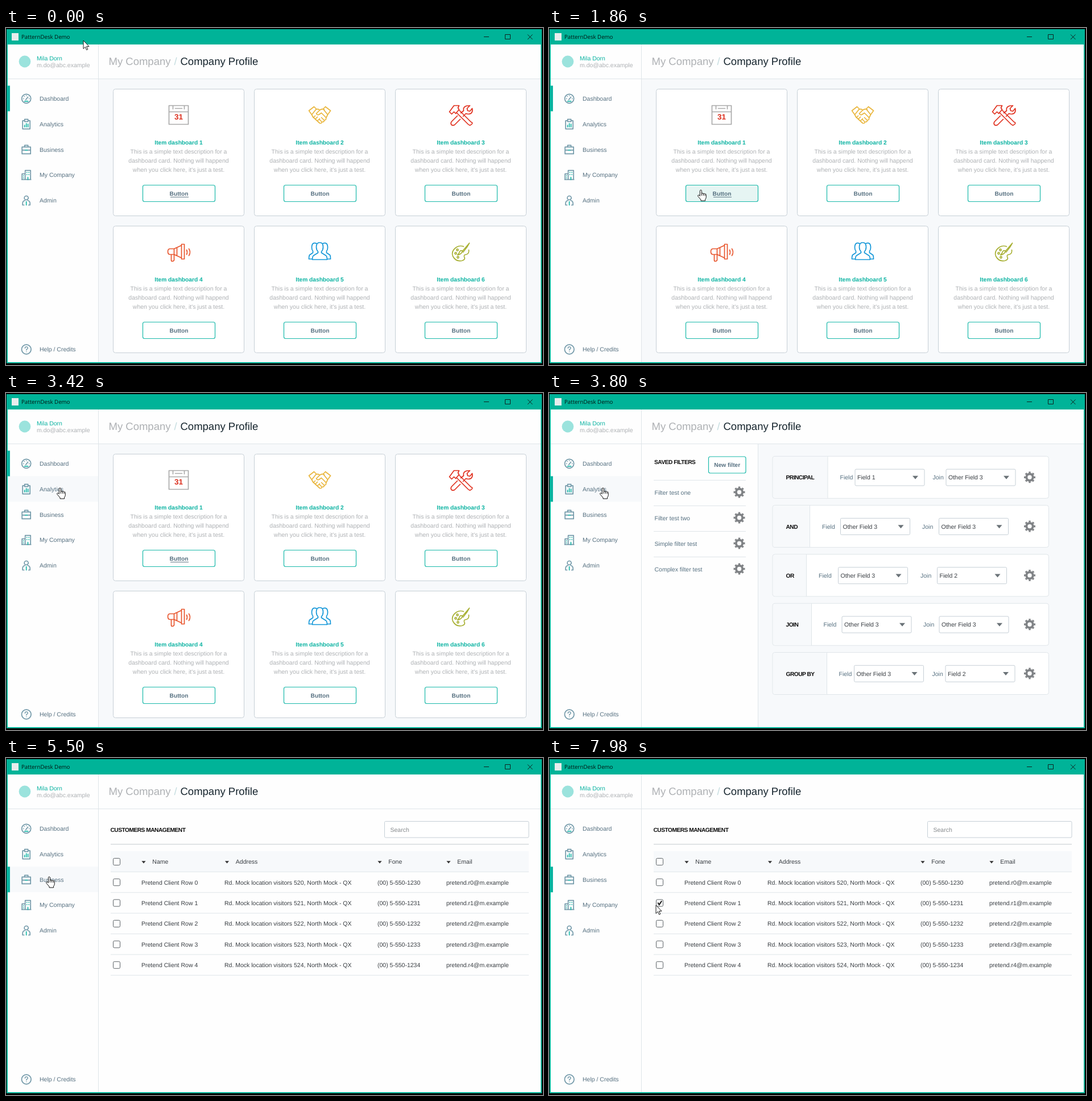
An HTML page that plays this animation: 944x593 px, repeating every 8000 ms.

```html
<!DOCTYPE html>
<html lang="en">
<head>
<meta charset="utf-8">
<title>Admin panel</title>
<style>
html, body { margin: 0; width: 100%; height: 100%; overflow: hidden; background: #000; }
svg { display: block; width: 944px; height: 593px; }
text { font: 10.5px "Liberation Sans", Arial, sans-serif; fill: #567080; text-rendering: geometricPrecision; white-space: pre; }
.mid { text-anchor: middle; }
.bold { font-size: 10.2px; font-weight: bold; }
.caps { font-size: 10.2px; font-weight: bold; letter-spacing: -.5px; fill: #0c0c0c; }
.teal { fill: #0cb3a2; }
.pale { fill: #aeb1b4; }
.dark { fill: #383d42; }
.big { font-size: 18.5px; }
.caption { font: 9.7px "Open Sans", sans-serif; fill: #021512; }
.icon { fill: none; stroke-width: 1.7; stroke-linejoin: round; stroke-linecap: round; }
.line { fill: none; stroke: #dfe5e9; }
.box { fill: #fff; stroke: #c6cfd6; }
.tint { fill: #f7f9fb; }
</style>
</head>
<body>
<svg viewBox="0 0 944 593">
  <rect x="2" y="3" width="939" height="586" fill="#fefefe" stroke="#00b398" stroke-width="2"/>
  <rect x="1" y="2" width="941" height="27" fill="#00b398"/>
  <rect x="10" y="9" width="12" height="13" fill="#e8eded"/>
  <path d="M840 15.5h9M877.5 11.5h9v8h-9zM917 11.5l8.5 8.5M925.5 11.5l-8.5 8.5" fill="none" stroke="#10221f"/>
  <g id="pages"></g>
  <g id="frame"></g>
  <path id="arrow" d="M0 0V14.5L3.4 11.3 5.6 16.6 7.8 15.6 5.6 10.4H10Z" fill="#fff" stroke="#000" stroke-width=".9"/>
  <path id="hand" d="M-1.6 10V1.6a1.5 1.5 0 0 1 3 0V6.8q0-1.2 1.5-1.1t1.5 1.3q.2-.9 1.4-.8t1.4 1.3q.2-.7 1.1-.5t1 1.4V12.5Q9.2 15 7.6 16.6V19H0V17.2L-4.9 11.4Q-6 9.6-4.4 8.9-3.1 8.7-1.6 10.6ZM1.4 7v3M4.4 7v3M7.2 8v2.4" fill="#fff" stroke="#000" stroke-width=".95"/>
</svg>
<script>
const $ = id => document.getElementById(id);
const each = (list, fn) => list.map(fn).join('');
const text = (x, y, s, cls = '') => `<text x="${x}" y="${y}" class="${cls}">${s}</text>`;
const rect = (x, y, w, h, cls, more = '') => `<rect x="${x}" y="${y}" width="${w}" height="${h}" class="${cls}" ${more}/>`;
const path = (d, more = 'class="line"') => `<path d="${d}" ${more}/>`;
const icon = (x, y, color, body) => `<g class="icon" transform="translate(${x} ${y})" stroke="${color}">${body}</g>`;
const button = (x, y, w, label, more = '') =>
  rect(x, y, w, 29, '', `rx="3" fill="#fff" stroke="#1ab9aa" stroke-width="1.2" ${more}`) +
  text(x + w / 2, y + 18.2, label, 'mid bold');
const triangle = (x, y, r, color) => path(`M${x - r} ${y - r * .55}h${2 * r}l${-r} ${r * 1.2}z`, `fill="${color}"`);
const gear = (x, y) => `<g transform="translate(${x} ${y})" fill="none" stroke="#808386">
  <circle r="5.7" stroke-width="4"/><circle r="8.5" stroke-width="3" pathLength="16" stroke-dasharray="1" stroke-dashoffset=".5"/></g>`;

// Dashboard
const cardIcons = [
  ['#aaa', 0, path('M-17-17H17V16H-17ZM-17-6H17M-10-17V-11M10-17V-11M-6-12H6', '') +
    '<text y="7" class="mid" style="font-weight:bold;font-size:13.5px;fill:#dc2f1e;stroke:none">31</text>'],
  ['#e9b63d', 0, path('M-19-8L-10-15-6-11-14-1ZM19-8L10-15 6-11 14-1ZM-7-10Q-3-12 0-9 4-12 8-10M-14-1L-12 3 0 14Q3 15 4 12 8 12 8 9 12 8 11 5L14-1M0-9L-6-3Q-4 1 0-2L3-4 11 4M-11 4l3-3M-8 7l4-4M-4 10l4-4M4 12l-4-4M8 9l-5-5', '')],
  ['#e0301e', 0, path('M-20-6L-12-17H-3L-5-13-3-10-9-3-12-6-16-2ZM-7-4L13 16Q16 19 19 16T18 12L-3-9M16-17L11-12 12-8 16-7 20-12Q22-3 14-2 11-2 9-3L4 2M-1 7L-11 17Q-15 19-17 16-18 13-16 11L-6 1M0-4L5-8Q3-17 16-17', '')],
  ['#e8562e', 0, path('M-8-6H-15Q-19-6-19-1T-15 4H-8ZM-8-6L5-12V10L-8 4ZM5-14h5v26h-5zM-3-8V6M-13 4V14Q-13 16-11 16T-8 14V4M14-4q2 4 0 8M18-6q4 6 0 12', '')],
  ['#1296d8', -2, path('M-6-7Q-6-15 0-15T6-7Q6-2 3 1V3L11 8Q13 10 13 15H-13Q-13 10-11 8L-3 3V1Q-6-2-6-7ZM-5-13Q-14-17-14-6-14-2-12 0V3L-18 7Q-19 9-19 14H-13M5-13Q14-17 14-6 14-2 12 0V3L18 7Q19 9 19 14H13', '')],
  ['#a9b136', 0, path('M5-10Q-3-13-10-7T-14 7Q-9 17 2 15 9 13 6 8 5 4 10 4 15 2 14-4M15-16L3-2Q1 4-6 5-3 3-2-1 0-4 3-2M15-16L11-9 4 0', '') +
    '<circle cx="-9" cy="2" r="1.6"/><circle cx="-6" cy="-4" r="1.6"/><circle cx="-5" cy="9" r="1.6"/>']
];
const blurb = ['This is a simple text description for a', 'dashboard card. Nothing will happend', "when you click here, it's just a test."];
const dashboard = rect(163, 90, 777, 498, 'tint') + each(cardIcons, ([color, dy, art], i) => {
  const x = 188.5 + i % 3 * 248, y = 107.5 + (i > 2) * 241, cx = x + 115;
  return rect(x, y, 230, 223, 'box', 'rx="4"') + icon(cx, y + 46 + dy, color, art) +
    text(cx, y + 97.2, `Item dashboard ${i + 1}`, 'mid bold teal') +
    each(blurb, (s, j) => text(cx, y + 113.4 + 16 * j, s, 'mid pale')) +
    button(x + 52, y + 169, 127, 'Button', i ? '' : 'id="press"');
}) + path('M289 297.5h32', 'stroke="#5f7785"');

// Analytics
const select = (x, y, value) => rect(x, y, 122, 29, 'box', 'rx="2"') +
  text(x + 4, y + 18.2, value, 'dark') + triangle(x + 106, y + 14.5, 5, '#6b7378');
// label, divider, first label, first select, second label, second select, values
const clauses = [
  ['PRINCIPAL', 490, 511.5, 538, 674.5, 698, 'Field 1', 'Other Field 3'],
  ['AND', 458.5, 480, 512.5, 656, 685.5, 'Other Field 3', 'Other Field 3'],
  ['OR', 452.5, 474, 508.5, 653, 682.5, 'Other Field 3', 'Field 2'],
  ['JOIN', 461.5, 482.5, 515, 658, 686, 'Other Field 3', 'Other Field 3'],
  ['GROUP BY', 488.5, 509.5, 536.5, 673.5, 697, 'Other Field 3', 'Field 2']
];
const analytics = rect(368, 90, 572, 498, 'tint') + path('M367.5 90V588') +
  text(185, 125.2, 'SAVED FILTERS', 'caps') + button(280.5, 112, 65.5, 'New filter') +
  each(['Filter test one', 'Filter test two', 'Simple filter test', 'Complex filter test'], (s, i) => {
    const y = 153.5 + 45 * i;
    return path(`M184 ${y}H346`) + text(185.5, y + 25, s) + gear(334.5, y + 21);
  }) +
  each(clauses, ([name, split, l1, s1, l2, s2, v1, v2], i) => {
    const y = 111.3 + 86.3 * i, base = y + 41;
    return rect(393, y, 485.5, 74, '', 'rx="4" fill="#fff" stroke="#dfe5e9"') +
      rect(394, y + .8, split - 394, 72.5, 'tint', 'rx="3"') + path(`M${split} ${y}v74`) +
      text(416.5, base, name, 'caps') + text(l1, base, 'Field') + select(s1, y + 22.8, v1) +
      text(l2, base, 'Join') + select(s2, y + 22.8, v2) + gear(845, y + 37);
  });

// Business
const check = y => rect(188.5, y - 6, 12, 12, '', 'rx="2" fill="#fff" stroke="#5c6266"');
const business = text(183.5, 129.5, 'CUSTOMERS MANAGEMENT', 'caps') +
  rect(665.5, 111.5, 253.5, 28.5, 'box', 'rx="2"') + text(675.5, 129.6, 'Search', '" style="fill:#85898c') +
  path('M184 151.8H919', 'stroke="#c4c9cd"') + rect(184, 164, 735, 36, 'tint') + check(182.5) + path('M184 200.3H919') +
  each([['Name', 242], ['Address', 388.5], ['Fone', 657], ['Email', 778]],
    ([s, x]) => triangle(x, 183.2, 3.6, '#333') + text(x + 15.3, 186.2, s, 'dark')) +
  each([0, 1, 2, 3, 4], i => {
    const y = 218.7 + 36.4 * i;
    return check(y) + text(238, y + 3.8, `Pretend Client Row ${i}`, 'dark') +
      text(384, y + 3.8, `Rd. Mock location visitors 52${i}, North Mock - QX`, 'dark') +
      text(653, y + 3.8, `(00) 5-550-123${i}`, 'dark') +
      text(774, y + 3.8, `pretend.r${i}@m.example`, 'dark') + path(`M184 ${y + 18}H919`);
  }) + path('M191.3 254.5l2.4 3.6 4.5-6.6', 'id="tick" fill="none" stroke="#222" stroke-width="2.2"');

// Sidebar and heading
const accent = d => path(d, 'stroke="#18b7a8"');
const menu = [
  ['Dashboard', path('M8 0A8 8 0 1 1-8 0 8 8 0 1 1 8 0M-1 2L3-3', '') + path('M-5 0h.1M-3.5-4h.1M0-5.3h.1M5 0h.1', '') + accent('M-3 4.5H3')],
  ['Analytics', path('M-3-6H-6.5V8.5H6.5V-6H3M-3-8.5H3V-4.5H-3Z', '') + accent('M-3 5V2M0 5V-1M3 5V0')],
  ['Business', path('M-7.5-4.5H7.5V7.5H-7.5ZM-3-4.5V-7.5H3V-4.5M-7.5 1H-2M2 1H7.5', '') + accent('M-1.5 1H1.5')],
  ['My Company', path('M-7.5 8V-2H-2M-2 8V-8H7.5V8ZM-8 8H8', '') + accent('M1-4.5h.1M4.5-4.5h.1M1-.8h.1M4.5-.8h.1M-5 1.5h.1M-5 5h.1M2.8 8V4')],
  ['Admin', path('M3.5-4.5A3.5 3.5 0 1 1-3.5-4.5 3.5 3.5 0 1 1 3.5-4.5M-2.5 0Q-6.5 1-6.5 5V8H-4M2.5 0Q6.5 1 6.5 5V8H4', '') + accent('M0 2V8')]
];
$('frame').innerHTML = path('M162.5 29V588M3 89.5H940') +
  '<circle cx="33" cy="59" r="10.4" fill="#9be3dd"/>' +
  text(27, 19, 'PatternDesk Demo', 'caption') +
  text(54, 56.8, 'Mila Dorn', 'teal') + text(54, 69.3, 'm.do@abc.example', 'pale') +
  text(180.5, 64.5, 'My Company', 'big pale') + text(295.5, 64.5, '/', 'big" style="fill:#c3dcdf') +
  text(306.5, 64.5, 'Company Profile', 'big" style="fill:#15242d') +
  rect(3, 0, 159, 45, 'tint', 'id="hover"') + rect(3, 0, 4, 45, 'teal', 'id="active"') +
  each(menu, ([s, art], i) => icon(35.7, 124.3 + 44.8 * i, '#7299a9', art) + text(59, 128 + 44.8 * i, s)) +
  icon(35.8, 565.5, '#7299a9', '<circle r="8.3"/>' + path('M-2.4-2Q-2.2-4.6 0-4.6T2.5-2.3Q2.4-1 0 .4V1.5M0 4.2h.1', 'stroke-width="1.4"')) +
  text(59, 569.3, 'Help / Credits');

const pages = [dashboard, analytics, business];
$('pages').innerHTML = each(pages, s => `<g>${s}</g>`);
const groups = [...$('pages').children];

// start, end, steps, target x, target y, downward bow
const moves = [
  [860, 1630, 11, 267, 285, 0],
  [2730, 3420, 10, 95, 167, 0],
  [4570, 5040, 7, 76, 209, 0],
  [6430, 6890, 7, 76, 252, 0],
  [7440, 7980, 8, 188, 259, 8]
];
function pointer(t) {
  let x = 136, y = 22;
  for (const [from, to, n, tx, ty, bow] of moves) {
    if (t < from) break;
    const p = Math.min(n, Math.floor((t - from) / (to - from) * (n - 1) + 1.1)) / n;
    const e = 1 - (1 - p) ** 2;
    x += (tx - x) * e;
    y += (ty - y) * e + bow * 4 * p * (1 - p);
  }
  return [x, y];
}
const show = (el, on) => el.style.display = on ? '' : 'none';

function draw(now) {
  const t = now % 8000, page = (t >= 3800) + (t >= 5500);
  const [x, y] = pointer(t);
  const row = Math.floor((y - 102) / 45);
  const onMenu = x < 162 && row >= 0 && row < menu.length;
  const onButton = page === 0 && x > 240 && x < 368 && y > 276 && y < 306;
  groups.forEach((g, i) => show(g, i === page));
  $('active').setAttribute('y', 101.5 + 44.9 * page);
  $('hover').setAttribute('y', 101.5 + 44.9 * row);
  show($('hover'), onMenu);
  $('press').setAttribute('fill', t >= 1860 && t < 2410 ? '#e6f5f3' : '#fff');
  show($('tick'), t >= 7980);
  for (const id of ['arrow', 'hand']) {
    $(id).setAttribute('transform', `translate(${x} ${y})`);
    show($(id), (id === 'hand') === (onMenu || onButton));
  }
  requestAnimationFrame(draw);
}
requestAnimationFrame(draw);
</script>
</body>
</html>
```
